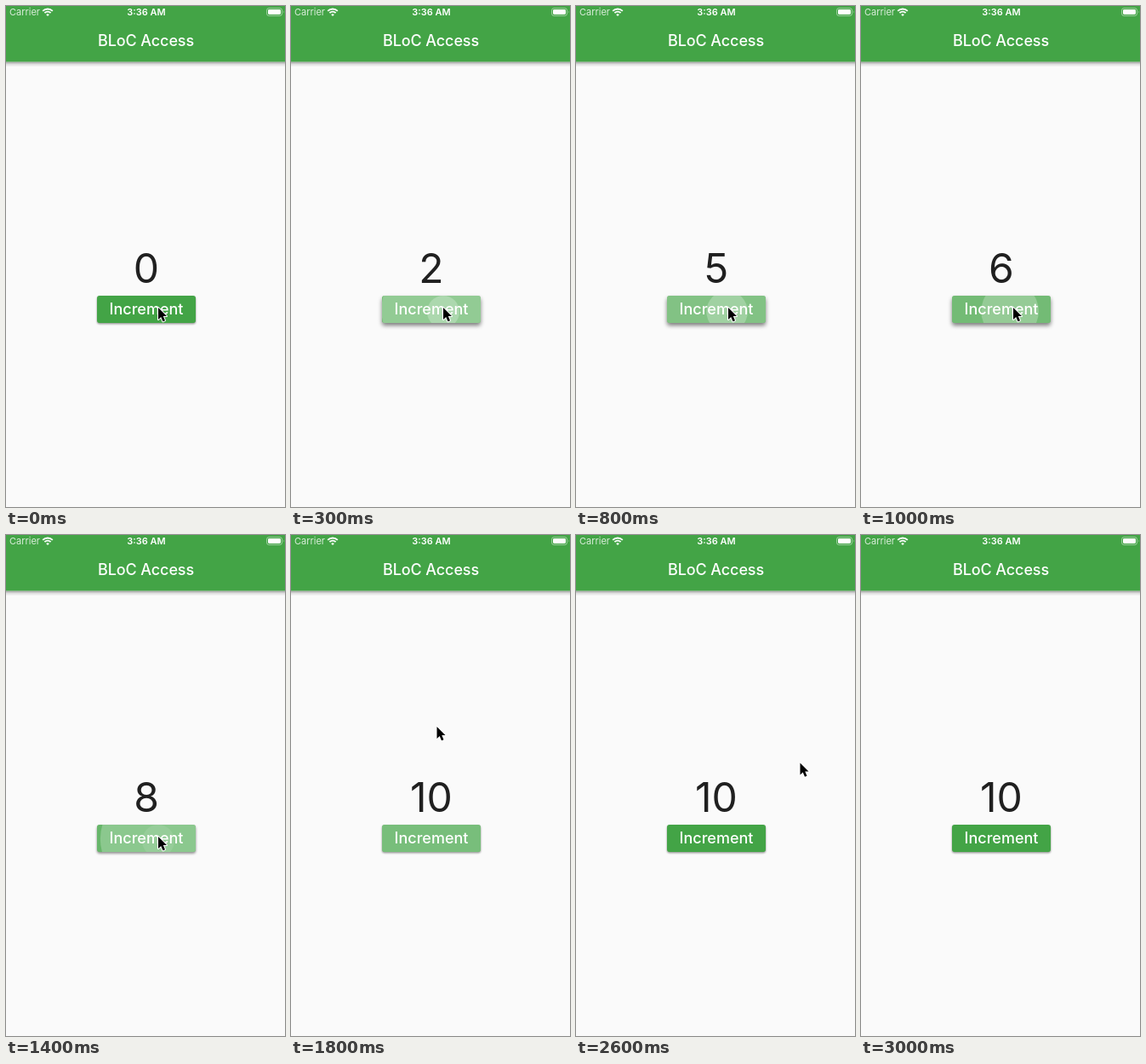
These frames come from a looping animation (328 by 588 pixels, 3.5 s). An HTML page:

```html
<!DOCTYPE html>
<html lang="en">
<head>
<meta charset="utf-8">
<title>BLoC Access</title>
<style>
  html, body { margin: 0; width: 100%; height: 100%; overflow: hidden; background: #fafafa; }
  svg { display: block; width: 100%; height: 100%; }
  text { font-family: Inter, Roboto, sans-serif; fill: #fff; text-anchor: middle; }
</style>
</head>
<body>
<svg viewBox="0 0 328 588" xmlns="http://www.w3.org/2000/svg">
  <defs>
    <clipPath id="clip"><rect x="107" y="340" width="116" height="32" rx="3"/></clipPath>
    <filter id="blur" x="-20%" y="-50%" width="140%" height="200%"><feGaussianBlur id="soft" stdDeviation="1.2"/></filter>
    <linearGradient id="fade" x1="0" y1="0" x2="0" y2="1">
      <stop offset="0" stop-opacity=".38"/>
      <stop offset=".45" stop-opacity=".12"/>
      <stop offset="1" stop-opacity="0"/>
    </linearGradient>
  </defs>

  <rect width="328" height="588" fill="#fafafa"/>
  <rect y="65.5" width="328" height="6" fill="url(#fade)"/>
  <rect width="328" height="65.5" fill="#43a446"/>

  <text x="4" y="11" font-size="11" style="text-anchor:start" opacity=".8">Carrier</text>
  <g fill="none" stroke="#fff" stroke-width="1.9">
    <path d="M43.2 5.9A8.2 8.2 0 0 1 54.8 5.9"/>
    <path d="M45.4 8.2A5 5 0 0 1 52.6 8.2"/>
  </g>
  <path d="M49 12L47.1 10.1A2.7 2.7 0 0 1 50.9 10.1Z" fill="#fff"/>
  <text x="165" y="11" font-size="11" font-weight="600">3:36 AM</text>
  <rect x="306.5" y="2.5" width="18" height="9" rx="2.6" fill="none" stroke="#fff" stroke-opacity=".45"/>
  <rect x="308" y="4" width="15" height="6" rx="1.4" fill="#fff"/>
  <path d="M326 5.4Q327.4 7 326 8.6Z" fill="#fff" opacity=".5"/>
  <text x="164.5" y="47" font-size="18" font-weight="500" letter-spacing="-.1">BLoC Access</text>

  <text id="count" x="165" y="325" font-size="48" style="fill:#202020">0</text>

  <rect id="shadow" x="107" y="341.5" width="116" height="32" rx="3" filter="url(#blur)"/>
  <g clip-path="url(#clip)">
    <rect x="107" y="340" width="116" height="32" fill="#43a446"/>
    <rect id="glow" x="107" y="340" width="116" height="32" fill="#fff"/>
    <g id="ripples" fill="#fff"></g>
  </g>
  <text x="165" y="362" font-size="18" font-weight="500">Increment</text>

  <path id="cursor" d="M0 0V14L3.2 11L5.5 16.3L8 15.2L5.8 10.1H10Z"
        fill="#000" stroke="#fff" stroke-width="2" stroke-linejoin="round" paint-order="stroke"/>
</svg>
<script>
  const LOOP = 3500, STEP = 100, HOLD = 70, GROW = 150, INK = 0.24;
  // release times of the taps
  const taps = [180, 300, 440, 610, 785, 958, 1125, 1290, 1450, 1650];
  // pointer path: time, x, y
  const path = [
    [0, 179, 354], [1650, 179, 354], [1800, 171.5, 225], [1900, 178, 224],
    [2000, 206, 236], [2100, 237, 253], [2200, 250, 261], [2500, 257, 265],
    [2700, 270, 270], [2900, 304, 281]
  ];

  const el = id => document.getElementById(id);
  const set = (node, attrs) => { for (const k in attrs) node.setAttribute(k, attrs[k]); };
  const clamp = v => Math.max(0, Math.min(1, v));
  const mix = (a, b, p) => a + (b - a) * p;

  const rings = taps.map(() => {
    const c = document.createElementNS("http://www.w3.org/2000/svg", "circle");
    el("ripples").append(c);
    return c;
  });

  function pointer(t) {
    const i = path.findIndex(k => k[0] > t);
    if (i < 0) return path[path.length - 1].slice(1);
    const a = path[i - 1], b = path[i], p = (t - a[0]) / (b[0] - a[0]);
    return [mix(a[1], b[1], p), mix(a[2], b[2], p)];
  }

  function draw(t) {
    let glow = 0, lift = 0;
    taps.forEach((up, i) => {
      const age = t - up, held = age + HOLD, p = clamp(age / GROW);
      const ink = clamp(held / 50) * clamp(1 - (age - GROW) / 100);
      set(rings[i], {
        cx: mix(179, 165, p), cy: mix(359, 356, p),
        r: mix(19, 72, p), opacity: INK * ink
      });
      glow = Math.max(glow, clamp(held / 25) * clamp(1 - age / 200));
      lift = Math.max(lift, clamp(held / 60) * clamp((130 - age) / 70));
    });
    el("count").textContent = taps.filter(up => up <= t).length;
    set(el("glow"), { opacity: INK * glow });
    set(el("shadow"), { y: mix(341.3, 343, lift), opacity: mix(.42, .5, lift) });
    set(el("soft"), { stdDeviation: mix(1.1, 2.4, lift) });
    set(el("cursor"), {
      transform: `translate(${pointer(t)})`,
      visibility: t < 3000 ? "visible" : "hidden"
    });
  }

  let start;
  function tick(now) {
    start ??= now;
    draw(Math.floor((now - start) % LOOP / STEP) * STEP);
    requestAnimationFrame(tick);
  }
  draw(0);
  requestAnimationFrame(tick);
</script>
</body>
</html>
```
